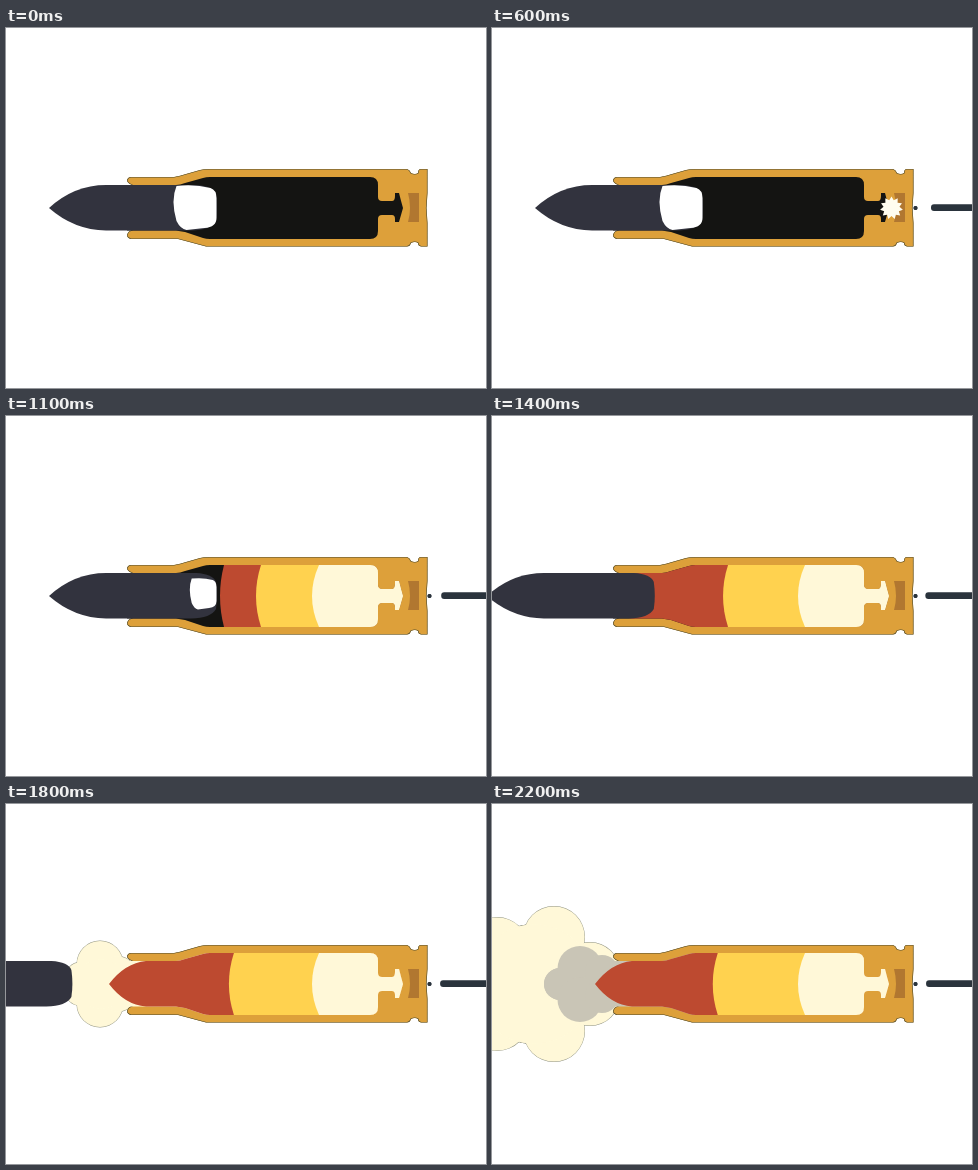
These frames come from a looping animation (480 by 360 pixels, 2.4 s). An HTML page with a canvas:

```html
<!DOCTYPE html>
<html>
<head>
<meta charset="utf-8">
<style>
html, body { margin: 0; width: 100%; height: 100%; overflow: hidden; background: #fff; }
canvas { display: block; }
</style>
</head>
<body>
<canvas id="stage" width="480" height="360"></canvas>
<script>
const ctx = document.getElementById('stage').getContext('2d');
const LOOP = 2400, AXIS = 180;
const GOLD = '#dda03a', BLACK = '#141412', SLATE = '#32333e', CREAM = '#fff8d8', YELLOW = '#ffd24f',
  RED = '#bd4a30', BROWN = '#b17730', GRAY = '#c9c5b6', EDGE = '#4a4a30', STEEL = '#2a333c';

const casing = new Path2D(`M125 149H168Q174 148 180 146L194 142Q198 141 203 141H401
  Q404 142 405 145Q409 147 412 145Q412 141 415 141H421.5V165L420.5 180L421.5 195V218.5H415
  Q412 218 412 215Q409 213 405 215Q404 218.5 401 218.5H200L172 211H125Q121 210 121 207
  Q122 203 126 202V157Q121 155 121 152Q122 149 125 149Z`);
const chamber = `H170Q174 157 179 155L197 150Q200 149 204 149H364Q372 149 372 157V169
  Q372 173 376 173H386Q389 173 389 168V165H393Q395 173 397 180Q395 187 393 194H389V191
  Q389 187 386 187H376Q372 187 372 191V203Q372 211 364 211H204Q200 211 197 210L179 204Q174 203 170 202.5`;
const cavity = new Path2D(`M121 157${chamber}H121Z`);
const flame = new Path2D(`M103 180Q119 159 140 157${chamber}H140Q119 201 103 180Z`);
const primer = new Path2D('M402 165H413V194H402Q406 180 402 165Z');
const bullet = new Path2D(`M43 180Q68 157 100 157H190Q207 158 210 166Q212 180 210 193
  Q205 202 185 202.5H100Q68 202 43 180Z`);
// Gap outline, relative to the middle of the bullet's base
const gap = new Path2D(`M-40 -22Q-22 -24 -6 -20Q0 -18 0 -10V10Q0 19 -12 20L-30 22
  Q-36 21 -40 13Q-46 -8 -40 -22Z`);

const clamp = v => Math.min(1, Math.max(0, v));
const mix = (a, b, k) => a + (b - a) * k;

function fill(path, color) {
  ctx.fillStyle = color;
  ctx.fill(path);
}

// Fill each circle and its mirror image across the axis
function puff(x, dy, r, color) {
  for (const side of [-1, 1]) {
    const path = new Path2D();
    path.arc(x, AXIS + side * dy, Math.max(0, r), 0, 2 * Math.PI);
    fill(path, color);
  }
}

function drawCloud(t) {
  const grow = clamp((t - 1500) / 300), spread = clamp((t - 1800) / 400) ** 2;
  if (!grow) return;
  const grown = (x, dy, r, x2, dy2, r2) =>
    [mix(112, mix(x, x2, spread), grow), mix(dy, dy2, spread) * grow, mix(r, r2, spread) * grow];
  const puffs = [
    grown(94, 20, 23.5, 62, 47, 31),
    grown(74, 7, 15, 5, 35, 32),
    grown(112, 10, 18, 98, 12, 30),
    grown(95, 0, 25, 42, 0, 60)
  ];
  for (const [x, dy, r] of puffs) puff(x, dy, r, '#8f9280');
  for (const [x, dy, r] of puffs) puff(x, dy, r - 0.4, CREAM);

  const smoke = clamp((t - 1800) / 400);
  puff(mix(112, 68, smoke), 0, 16 * smoke, GRAY);
  puff(mix(112, 88, smoke), 15.5 * smoke, 22.5 * smoke, GRAY);
  puff(110, 12 * smoke, 17 * smoke, GRAY);
}

function drawCase(t) {
  fill(casing, GOLD);
  ctx.save();
  ctx.clip(casing);
  ctx.strokeStyle = EDGE;
  ctx.lineWidth = 1.2;
  ctx.stroke(casing);
  ctx.restore();
  fill(cavity, t < 1500 ? BLACK : t < 2000 ? CREAM : GRAY);
  fill(primer, BROWN);
}

function drawFront(x, bulge, color) {
  fill(new Path2D(`M${x + bulge} 149Q${x - bulge} 180 ${x + bulge} 211H400V149Z`), color);
}

function drawFlame(t) {
  if (t < 700) return;
  const burn = Math.max(0, 1100 - t), settle = Math.exp(Math.min(0, 1100 - t) / 300);
  ctx.save();
  ctx.clip(flame);
  if (t >= 1000) drawFront(214 + 0.42 * (1100 - t), 4, RED);
  if (t >= 800) drawFront(220 + 30 * settle + 0.28 * burn, 5, YELLOW);
  drawFront(306 + 0.19 * burn, 7 + burn / 60, CREAM);
  ctx.restore();
}

function drawSpark(radius) {
  const path = new Path2D();
  for (let i = 0; i < 22; i++) {
    const a = i * Math.PI / 11, r = i % 2 ? radius * 0.7 : radius;
    path.lineTo(399.5 + r * Math.sin(a), AXIS - r * Math.cos(a));
  }
  fill(path, '#fffdf0');
}

function drawBullet(t) {
  ctx.save();
  ctx.translate(-0.241 * Math.max(0, t - 1200), 0);
  fill(bullet, SLATE);
  if (t < 1200) {
    const squeeze = clamp((t - 800) / 300);
    ctx.translate(210.5, AXIS - 2 * squeeze);
    ctx.scale(1 - 0.38 * squeeze ** 2, 1 - 0.3 * squeeze);
    fill(gap, '#fff');
  }
  ctx.restore();
}

// The pin strikes at 500 ms, then rebounds with a damped wobble
function drawPin(t) {
  if (t < 300) return;
  const since = t - 600;
  const x = t <= 500 ? 424 + 0.21 * (500 - t)
    : 434 + 5 * Math.exp(-since / 400) * Math.cos(2 * Math.PI * since / 550);
  const path = new Path2D();
  path.roundRect(x, 176.3, 70, 6.7, 3);
  fill(path, STEEL);
  if (t >= 500) puff(423.5, 0, 2, STEEL);
}

function draw(t) {
  ctx.fillStyle = '#fff';
  ctx.fillRect(0, 0, 480, 360);
  drawCloud(t);
  drawCase(t);
  drawFlame(t);
  if (t >= 500 && t < 700) drawSpark(t < 600 ? 6 : 11.5);
  drawBullet(t);
  drawPin(t);
}

// The picture advances every 100 ms, with a few longer holds
function tick() {
  let t = Math.floor(performance.now() % LOOP / 100) * 100;
  if ([200, 1900, 2100, 2300].includes(t)) t -= 100;
  draw(t);
  requestAnimationFrame(tick);
}
tick();
</script>
</body>
</html>
```
